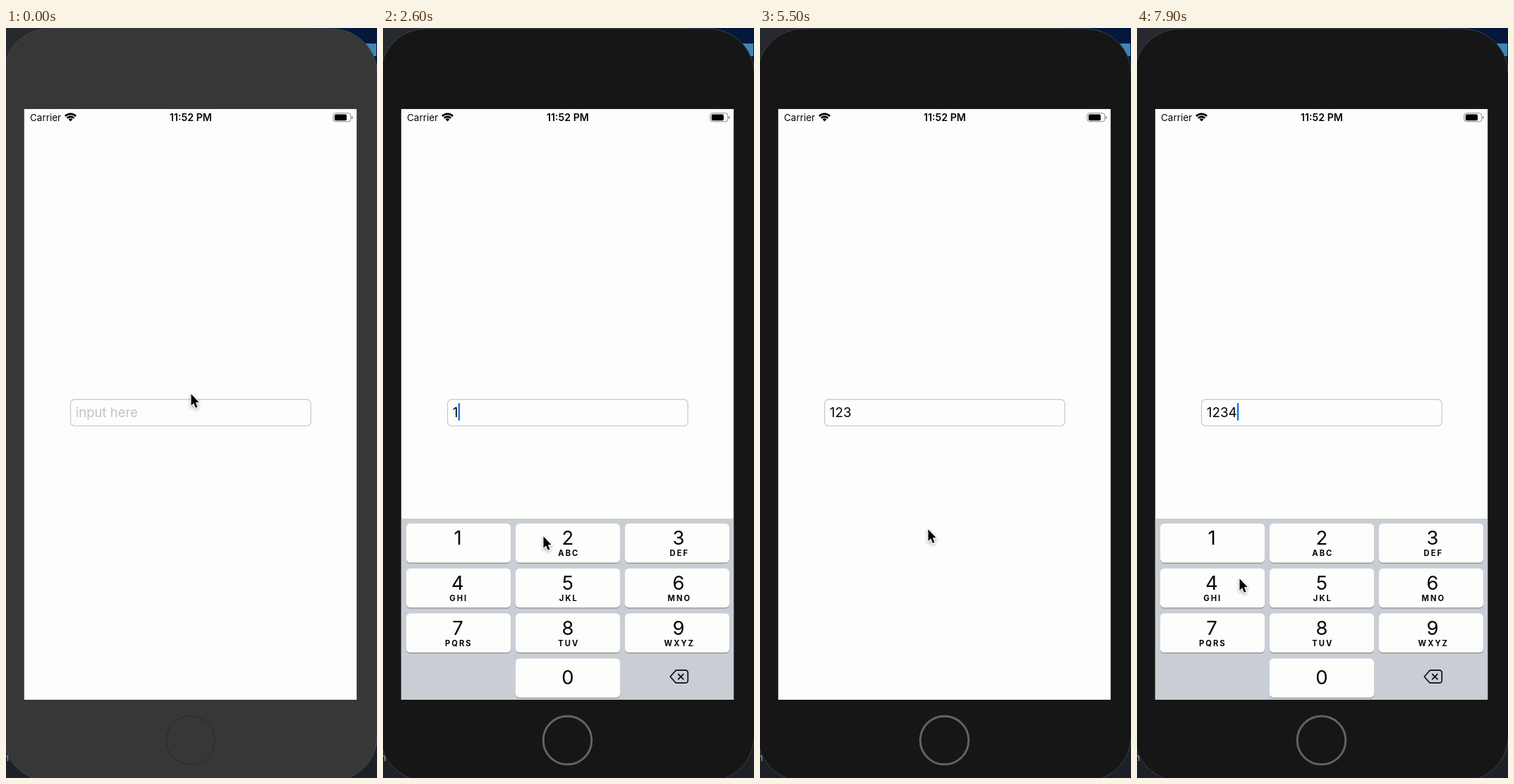
An HTML page with a canvas that plays this animation: 526 px wide and 1064 px high, repeating every 8000 ms.

```html
<!DOCTYPE html>
<html lang="en">
<head>
<meta charset="utf-8">
<title>Number pad input</title>
<style>
  html, body { margin: 0; width: 100%; height: 100%; overflow: hidden; background: #1d2127; }
  canvas { display: block; }
</style>
</head>
<body>
<canvas id="stage" width="526" height="1064"></canvas>
<script>
const ctx = document.getElementById('stage').getContext('2d');
const LOOP = 8000;
const STEP = 100;
const SCREEN = { x: 25.6, y: 114.8, w: 471.8, h: 838.2 };
const PAD_TOP = 696;
const PAD_HEIGHT = SCREEN.y + SCREEN.h - PAD_TOP;
const ACTIVATE = 800;
const FOCUS = [[1050, 4760], [6560, LOOP]];
const TYPED = [[2250, '1'], [2750, '2'], [3500, '3'], [7600, '4']];
const LETTERS = ['', 'ABC', 'DEF', 'GHI', 'JKL', 'MNO', 'PQRS', 'TUV', 'WXYZ'];

// Pointer stops: time, x, y
const POINTER = [
  [0, 262, 519], [600, 232, 546], [1650, 232, 546],
  [2150, 112, 731], [2300, 112, 731], [2600, 227, 721], [2850, 230, 724],
  [3350, 386, 727], [3600, 386, 727], [4500, 225, 431], [4900, 225, 431],
  [5500, 238, 711], [5950, 238, 711], [6400, 176, 550],
  [6950, 176, 550], [7450, 145, 781], [LOOP, 145, 781]
];

const smooth = p => p * p * (3 - 2 * p);

function pointerAt(t) {
  const i = Math.max(1, POINTER.findIndex(stop => stop[0] >= t));
  const [t0, x0, y0] = POINTER[i - 1];
  const [t1, x1, y1] = POINTER[i];
  const p = smooth((t - t0) / (t1 - t0));
  return [x0 + (x1 - x0) * p, y0 + (y1 - y0) * p];
}

// Critically damped spring, from 0 to 1
function spring(ms) {
  if (ms <= 0) return 0;
  const s = ms * 0.01826;
  return 1 - (1 + s) * Math.exp(-s);
}

function padRise(t) {
  return FOCUS.reduce((sum, [on, off]) => sum + spring(t - on) - spring(t - off), 0);
}

function box(x, y, w, h, r, fill, stroke, width = 1) {
  ctx.beginPath();
  ctx.roundRect(x, y, w, h, r);
  if (fill) { ctx.fillStyle = fill; ctx.fill(); }
  if (stroke) { ctx.strokeStyle = stroke; ctx.lineWidth = width; ctx.stroke(); }
}

function label(text, x, y, size, { weight = 400, color = '#050505', align = 'left', spacing = 0 } = {}) {
  ctx.font = `${weight} ${size}px Inter, sans-serif`;
  ctx.letterSpacing = spacing + 'px';
  ctx.textAlign = align;
  ctx.fillStyle = color;
  ctx.fillText(text, x, y);
  const { width } = ctx.measureText(text);
  ctx.letterSpacing = '0px';
  return width;
}

function polyline(points, close) {
  ctx.beginPath();
  points.forEach(([x, y]) => ctx.lineTo(x, y));
  if (close) ctx.closePath();
}

function drawDesktop() {
  ctx.fillStyle = '#1d2127';
  ctx.fillRect(0, 0, 526, 1064);
  ctx.fillStyle = '#262a2e';
  ctx.fillRect(0, 0, 432, 532);
  ctx.fillStyle = '#04183a';
  ctx.fillRect(432, 0, 94, 532);
  ctx.fillStyle = '#3f86b4';
  ctx.fillRect(505, 22, 20, 18);
}

function drawBody(active) {
  box(-3.5, 1, 530, 1067.5, 65, active ? '#161616' : '#373737', active ? '#3d4145' : '#454749');
  label('n', -4, 1040, 14, { color: '#a0a0a0' });
  ctx.beginPath();
  ctx.arc(261.5, 1010.5, 34.3, 0, Math.PI * 2);
  ctx.strokeStyle = active ? '#636363' : '#272727';
  ctx.lineWidth = active ? 3 : 1;
  ctx.stroke();
}

function drawWifi(x, y) {
  const from = -Math.PI * 0.75, to = -Math.PI * 0.25;
  ctx.strokeStyle = ctx.fillStyle = '#000';
  ctx.lineWidth = 2.6;
  for (const r of [10.7, 6.7]) {
    ctx.beginPath();
    ctx.arc(x, y, r, from, to);
    ctx.stroke();
  }
  ctx.beginPath();
  ctx.moveTo(x, y);
  ctx.arc(x, y, 4, from, to);
  ctx.fill();
}

function drawStatusBar() {
  label('Carrier', 34, 132, 13.5);
  drawWifi(91.5, 132.6);
  label('11:52 PM', 262, 132, 14.2, { weight: 600, align: 'center' });
  box(463.8, 120.8, 25, 12, 3.5, null, '#858585');
  box(465.8, 122.6, 17.2, 8.6, 1.8, '#000');
  box(490, 125, 1.5, 4, 0.7, '#858585');
}

function drawField(t) {
  box(91.5, 526.8, 340.7, 37.7, 6, '#fdfdfc', '#c5c5d3', 1.2);
  const keys = TYPED.filter(([at]) => at <= t);
  const value = keys.map(([, key]) => key).join('');
  const width = value
    ? label(value, 98.8, 552, 18.8)
    : (label('input here', 98.8, 552, 18.5, { color: '#c3c3c5' }), 0);
  const focus = FOCUS.find(([on, off]) => t >= on && t < off);
  if (!focus) return;
  const since = t - Math.max(focus[0], ...keys.map(([at]) => at));
  if (since % 1000 < 600) box(99 + width, 532, 2.5, 25, 1, '#1f74ee');
}

function drawDelete(x, y) {
  ctx.strokeStyle = '#0a0a0a';
  ctx.lineWidth = 1.7;
  ctx.lineJoin = ctx.lineCap = 'round';
  ctx.beginPath();
  ctx.moveTo(x - 12.5, y);
  ctx.lineTo(x - 5.5, y - 8);
  ctx.quadraticCurveTo(x - 4.5, y - 9, x - 3, y - 9);
  ctx.arcTo(x + 12.5, y - 9, x + 12.5, y, 3.5);
  ctx.arcTo(x + 12.5, y + 9, x, y + 9, 3.5);
  ctx.lineTo(x - 3, y + 9);
  ctx.quadraticCurveTo(x - 4.5, y + 9, x - 5.5, y + 8);
  ctx.closePath();
  ctx.stroke();
  for (const d of [-3.6, 3.6]) {
    polyline([[x + 2.5 - d, y - 3.6], [x + 2.5 + d, y + 3.6]]);
    ctx.stroke();
  }
}

function drawKey(digit, column, row, letters) {
  const x = 33 + column * 155, y = 703 + row * 63.8;
  const mid = x + (column === 1 ? 74 : column ? 76 : 73);
  box(x, y + 1.2, 148, 55.5, 5.5, '#898d92');
  box(x, y, 148, 55.5, 5.5, '#fdfdfc');
  label(digit, mid, y + (digit === '0' ? 36.2 : 30), 27.5, { align: 'center' });
  label(letters, mid + 1.3, y + 46.2, 11.2, { weight: 700, align: 'center', spacing: 2 });
}

function drawPad(t) {
  const rise = padRise(t);
  if (rise < 0.002) return;
  ctx.save();
  ctx.translate(0, PAD_HEIGHT * (1 - rise));
  ctx.fillStyle = '#c9ced5';
  ctx.fillRect(SCREEN.x, PAD_TOP, SCREEN.w, PAD_HEIGHT);
  LETTERS.forEach((letters, i) => drawKey(String(i + 1), i % 3, Math.floor(i / 3), letters));
  drawKey('0', 1, 3, '');
  drawDelete(419.8, 920.2);
  ctx.restore();
}

function drawPointer(t) {
  const [x, y] = pointerAt(t);
  ctx.save();
  ctx.translate(x + 0.5, y + 0.3);
  ctx.scale(0.92, 0.95);
  polyline([[0, 0], [0, 17.3], [4, 13.6], [7, 20.6], [9.8, 19.4], [6.9, 12.6], [12, 12.3]], true);
  ctx.lineJoin = 'miter';
  ctx.lineWidth = 2.2;
  ctx.strokeStyle = '#fff';
  ctx.shadowColor = 'rgba(0,0,0,0.35)';
  ctx.shadowBlur = 4;
  ctx.shadowOffsetY = 2;
  ctx.stroke();
  ctx.shadowColor = 'transparent';
  ctx.fillStyle = '#000';
  ctx.fill();
  ctx.restore();
}

function draw(t) {
  drawDesktop();
  drawBody(t >= ACTIVATE);
  ctx.save();
  ctx.beginPath();
  ctx.rect(SCREEN.x, SCREEN.y, SCREEN.w, SCREEN.h);
  ctx.clip();
  ctx.fillStyle = '#fdfdfc';
  ctx.fillRect(SCREEN.x, SCREEN.y, SCREEN.w, SCREEN.h);
  drawStatusBar();
  drawField(t);
  drawPad(t);
  ctx.restore();
  drawPointer(t);
}

const start = performance.now();
function tick() {
  const elapsed = (performance.now() - start) % LOOP;
  draw(Math.floor(elapsed / STEP) * STEP);
  requestAnimationFrame(tick);
}
tick();
</script>
</body>
</html>
```
